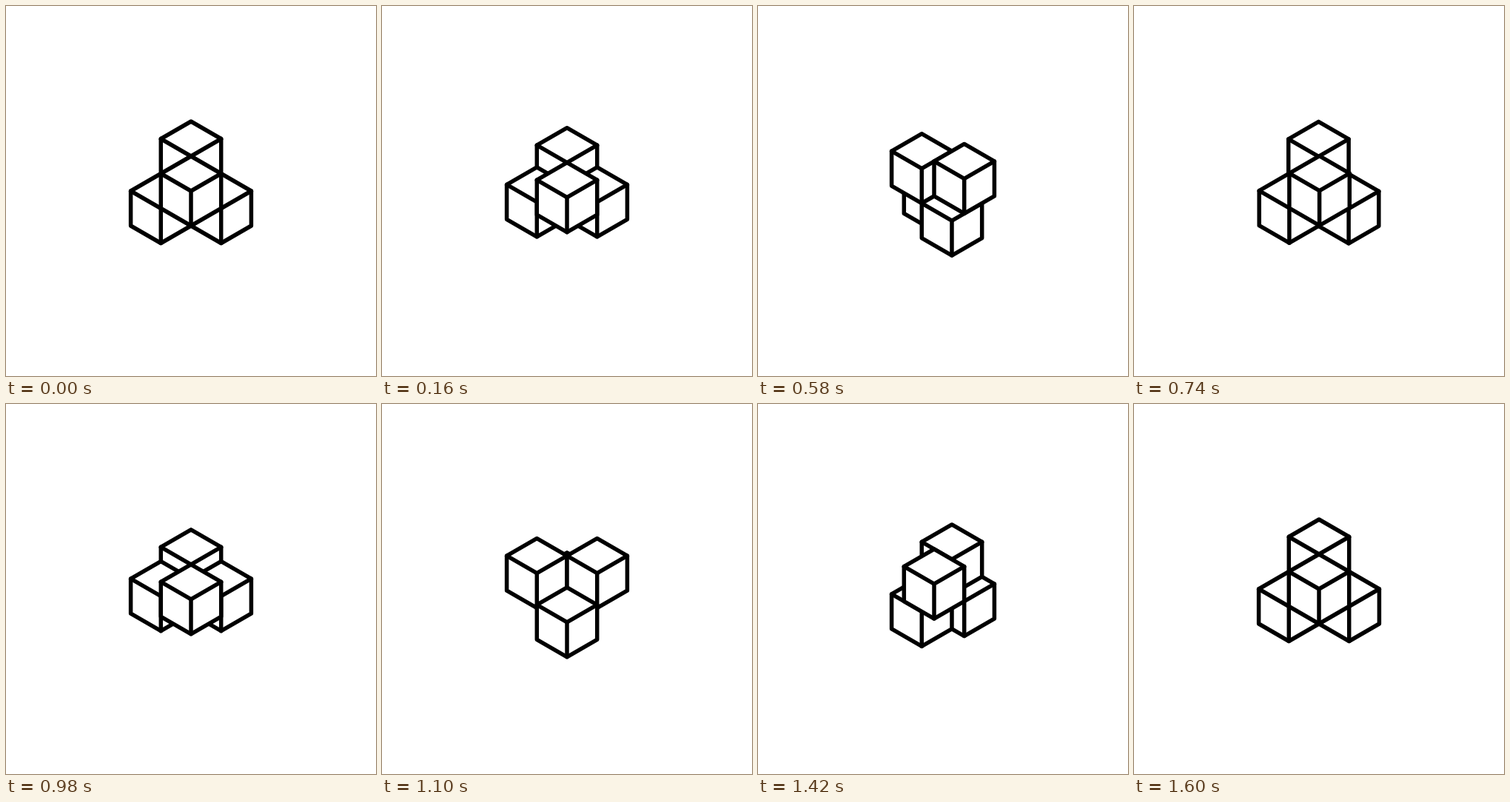
An HTML page with a canvas that plays this animation: 500x500 px, repeating every 1620 ms.

```html
<!DOCTYPE html>
<html lang="en">
<head>
<meta charset="utf-8">
<title>Sliding cubes</title>
<style>
  html, body { margin: 0; width: 100%; height: 100%; overflow: hidden; background: #fff; }
  canvas { display: block; }
</style>
</head>
<body>
<canvas id="stage" width="500" height="500"></canvas>
<script>
const ctx = document.getElementById('stage').getContext('2d');
const EDGE = 47, HALF = EDGE * Math.sqrt(3) / 2;
const LOOP = 1620, STEP = 400, TICK = 20;

// The cubes sit on alternate corners of a 2x2x2 lattice; each step slides all of them along one axis.
const CORNERS = [[0, 0, 1], [0, 1, 0], [1, 0, 0], [1, 1, 1]];
const X = 0, Y = 1, Z = 2;
const AXES = [Z, Y, Z, X];

// cubic-bezier(.8, 0, .2, 1), solved for its parameter by bisection
function ease(t) {
  let lo = 0, hi = 1;
  for (let i = 0; i < 30; i++) {
    const s = (lo + hi) / 2, r = 1 - s;
    if (2.4 * s * r * r + 0.6 * s * s * r + s ** 3 < t) lo = s; else hi = s;
  }
  return lo * lo * (3 - 2 * lo);
}

function path(points, closed) {
  ctx.beginPath();
  for (const [x, y] of points) ctx.lineTo(x * HALF, y * EDGE);
  if (closed) {
    ctx.closePath();
    ctx.fill();
  }
  ctx.stroke();
}

function drawCube([x, y, z]) {
  ctx.save();
  ctx.translate(250 + (x - y) * HALF, 250 + ((x + y) / 2 - z) * EDGE);
  path([[0, -1], [1, -.5], [1, .5], [0, 1], [-1, .5], [-1, -.5]], true);
  path([[-1, -.5], [0, 0], [1, -.5]]);
  path([[0, 0], [0, 1]]);
  ctx.restore();
}

function draw(time) {
  const step = Math.min(Math.floor(time / STEP), AXES.length - 1);
  const shift = ease(Math.min(time / STEP - step, 1));
  const depth = cube => cube[X] + cube[Y] + cube[Z];
  const cubes = CORNERS.map(corner => {
    const cube = [...corner];
    if (step % 2) cube[Z] = 1 - cube[Z];
    const axis = AXES[step];
    cube[axis] += (1 - 2 * cube[axis]) * shift;
    return cube;
  });
  ctx.fillStyle = '#fff';
  ctx.fillRect(0, 0, 500, 500);
  ctx.strokeStyle = '#000';
  ctx.lineWidth = 5.5;
  ctx.lineJoin = ctx.lineCap = 'round';
  cubes.sort((a, b) => depth(a) - depth(b)).forEach(drawCube);
}

const start = performance.now();
function tick() {
  const time = (performance.now() - start) % LOOP;
  draw(Math.floor(time / TICK) * TICK);
  requestAnimationFrame(tick);
}
tick();
</script>
</body>
</html>
```
